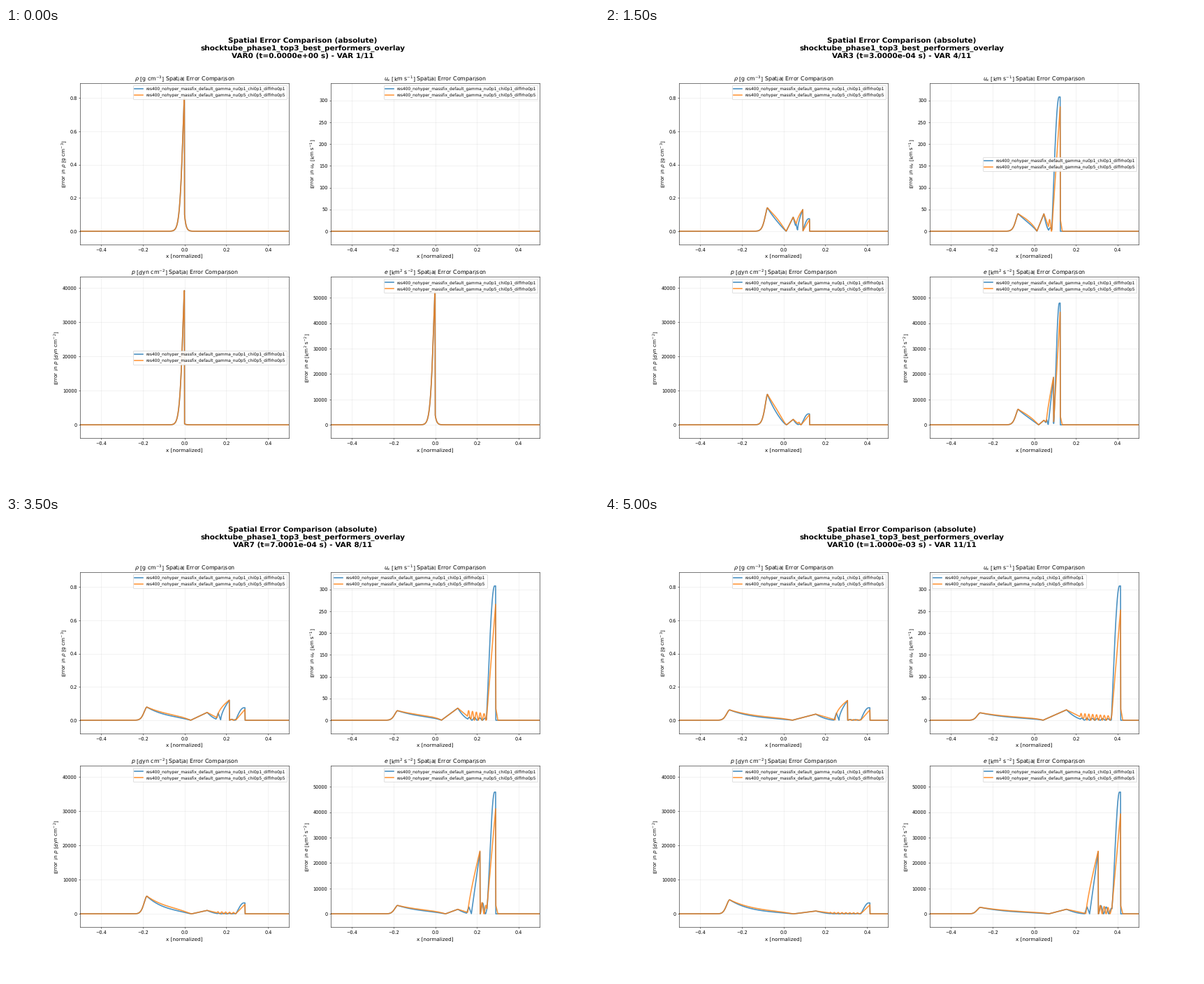
Write a matplotlib script that moves like this. It is 849 px wide and 660 px high and loops after 5.5 s.

```python
import numpy as np
import matplotlib.pyplot as plt
from matplotlib.animation import FuncAnimation

W, H = 849, 660
DPI = W / 18
STEPS = 11
X = np.linspace(-0.5, 0.5, 1001)
COLORS = ["#1f77b4", "#ff7f0e"]
NAMES = ["res400_nohyper_massfix_default_gamma_nu0p1_chi0p1_diffrho0p1",
         "res400_nohyper_massfix_default_gamma_nu0p5_chi0p5_diffrho0p5"]

# Distance travelled per step: rarefaction head, bump, contact, shock
HEAD, BUMP, CONTACT, SHOCK = -.0258, .0154, .0307, .0414

# Pairs in wing and bump are (height, decay power); ripple is (blue, orange).
PANELS = [
    dict(label=r"$\rho$ [g cm$^{-3}$]", top=.808, unit=1e-3, jump=808, foot=100,
         wing=(300, .685), bend=1.1, zero=.0042, bump=(85, .7),
         contact=115, lobe=.36, steep=.6, shock=75, sharp=1, toe=0, ripple=(45, 45)),
    dict(label=r"$u_x$ [km s$^{-1}$]", top=308.4, unit=1, jump=0, foot=0,
         wing=(88, .714), bend=.85, zero=.0042, bump=(40, .43),
         contact=0, lobe=0, steep=1, shock=308, sharp=1.1, toe=.1, ripple=(50, 160)),
    dict(label=r"$p$ [dyn cm$^{-2}$]", top=39245, unit=100, jump=392, foot=3,
         wing=(182, .647), bend=1.33, zero=.0048, bump=(16, .55),
         contact=0, lobe=0, steep=1, shock=32, sharp=1.2, toe=0, ripple=(12, 45)),
    dict(label=r"$e$ [km$^2$ s$^{-2}$]", top=52900, unit=100, jump=529, foot=38,
         wing=(137, .73), bend=1, zero=.007, bump=(18, 0),
         contact=250, lobe=.11, steep=1, shock=479, sharp=1.5, toe=.08,
         ripple=(350, 350)),
]


def ramp(a, b):
    """0 to 1 between a and b, then straight back to 0."""
    t = (X - a) / (b - a)
    return np.where((t > 0) & (t <= 1), t, 0)


def wing(p, k, run):
    head, zero = HEAD * k, p["zero"] * k
    size, decay = p["wing"]
    u = np.clip((X - head) / (zero - head), 0, 1)
    rate = .9 + .13 * k if run == 0 else .5 + .12 * k
    fall = (np.exp(-rate * u) * (1 - u ** (.6 + .9 * k))) ** p["bend"]
    rise = smooth_foot(head, k)
    return size * k ** -decay * np.where(X < head, rise, fall)


def smooth_foot(edge, k):
    d = np.maximum(edge - X, 0)
    return np.exp(-(d / (.016 + .0006 * k)) ** (1.4 + .04 * k))


def bump(p, k, run):
    size, decay = p["bump"]
    size *= (k / 3) ** -decay * min(1, (k - 1) / 2)
    fall = np.clip(1 - (X / k - BUMP) / .01, 0, 1) ** (2 - run)
    rise = ramp(p["zero"] * k, BUMP * k)
    return size * np.where(X <= BUMP * k, rise, fall)


def contact(p, k, run):
    scale = np.clip(k / 5, .4, 1)
    start = CONTACT * k - (.042, .06)[run] * scale
    size = p["contact"]
    size *= min(1, k / 4) if p["steep"] == 1 else 1 + .4 / k
    step = ramp(start, CONTACT * k) ** (p["steep"] * (1, .8)[run])
    if run == 1:
        return size * step
    half = .012 * scale
    lobe = np.clip(1 - abs(X - start + half) / half, 0, 1)
    return size * np.maximum(step, p["lobe"] * lobe)


def shock_start(p, k):
    start = SHOCK * k - min(.037 + .0012 * k, .045)
    return max(start, CONTACT * k) if p["contact"] else start


def shock(p, k, run):
    end = SHOCK * k
    t = ramp(shock_start(p, k), end)
    if run == 0:
        return p["shock"] * np.sin(np.pi / 2 * np.minimum(1, 1.15 * t)) ** p["sharp"]
    toe = p["toe"] * np.clip(1 - (X - end) / .01, 0, 1) * (X > end)
    return p["shock"] * (.97 - .013 * k) * np.maximum(t, toe)


def ripple(p, k, run):
    lo = CONTACT * k if p["contact"] else .0215 * k
    hi = shock_start(p, k) + .004
    if hi - lo < .01:
        return 0 * X
    t = ramp(lo, hi)
    wave = np.sin(np.pi * (X - lo) / (.025, .0185)[run]) ** 2
    return p["ripple"][run] / max(k, 5) * (t > 0) * (1 - .4 * t) * wave


def curve(p, run, k):
    if k == 0:
        right = p["foot"] * np.exp(-np.maximum(X, 0) / .007)
        y = np.where(X < 0, p["jump"] * smooth_foot(-.001, 0), right)
    else:
        parts = (wing, bump, contact, shock, ripple)
        y = np.maximum.reduce([part(p, k, run) for part in parts])
    return y * p["unit"]


def legend_spot(i, k):
    if (i, k) in ((2, 0), (1, 3)):
        return "center right"
    return "upper left" if i == 1 and k >= 7 else "upper right"


plt.rcParams["text.hinting"] = "no_hinting"
fig, axes = plt.subplots(2, 2, figsize=(W / DPI, H / DPI), dpi=DPI)
fig.patch.set_facecolor("white")


def heading(y, text=""):
    return fig.text(.5, 1 - y / H, text, ha="center", va="baseline",
                    fontsize=16, fontweight="bold")


heading(21, "Spatial Error Comparison (absolute)")
heading(32, "shocktube_phase1_top3_best_performers_overlay")
stamp = heading(43)

lines, legends = [], []
for ax, panel in zip(axes.flat, PANELS):
    lines.append([ax.plot(X, 0 * X, color=c, lw=2.5, alpha=.8, label=n)[0]
                  for c, n in zip(COLORS, NAMES)])
    ax.set_xlim(-.5, .5)
    ax.set_ylim(-.1 * panel["top"], 1.1 * panel["top"])
    ax.set_title(panel["label"] + " Spatial Error Comparison", fontsize=12)
    ax.set_xlabel("x [normalized]", fontsize=11)
    ax.set_ylabel("Error in " + panel["label"], fontsize=11)
    ax.grid(True, alpha=.3)
    legends.append(ax.legend(loc="upper right", fontsize=9, framealpha=.9))


def update(k):
    t = k * 1e-4 + (1e-8 if k in (1, 6, 7, 9) else 0)
    stamp.set_text(f"VAR{k} (t={t:.4e} s) - VAR {k + 1}/{STEPS}")
    for i, panel in enumerate(PANELS):
        for run, line in enumerate(lines[i]):
            line.set_ydata(curve(panel, run, k))
        legends[i].set_loc(legend_spot(i, k))
    return [stamp, *sum(lines, []), *legends]


anim = FuncAnimation(fig, update, frames=STEPS, interval=500,
                     repeat=True, repeat_delay=0, blit=False)
plt.show()
```
